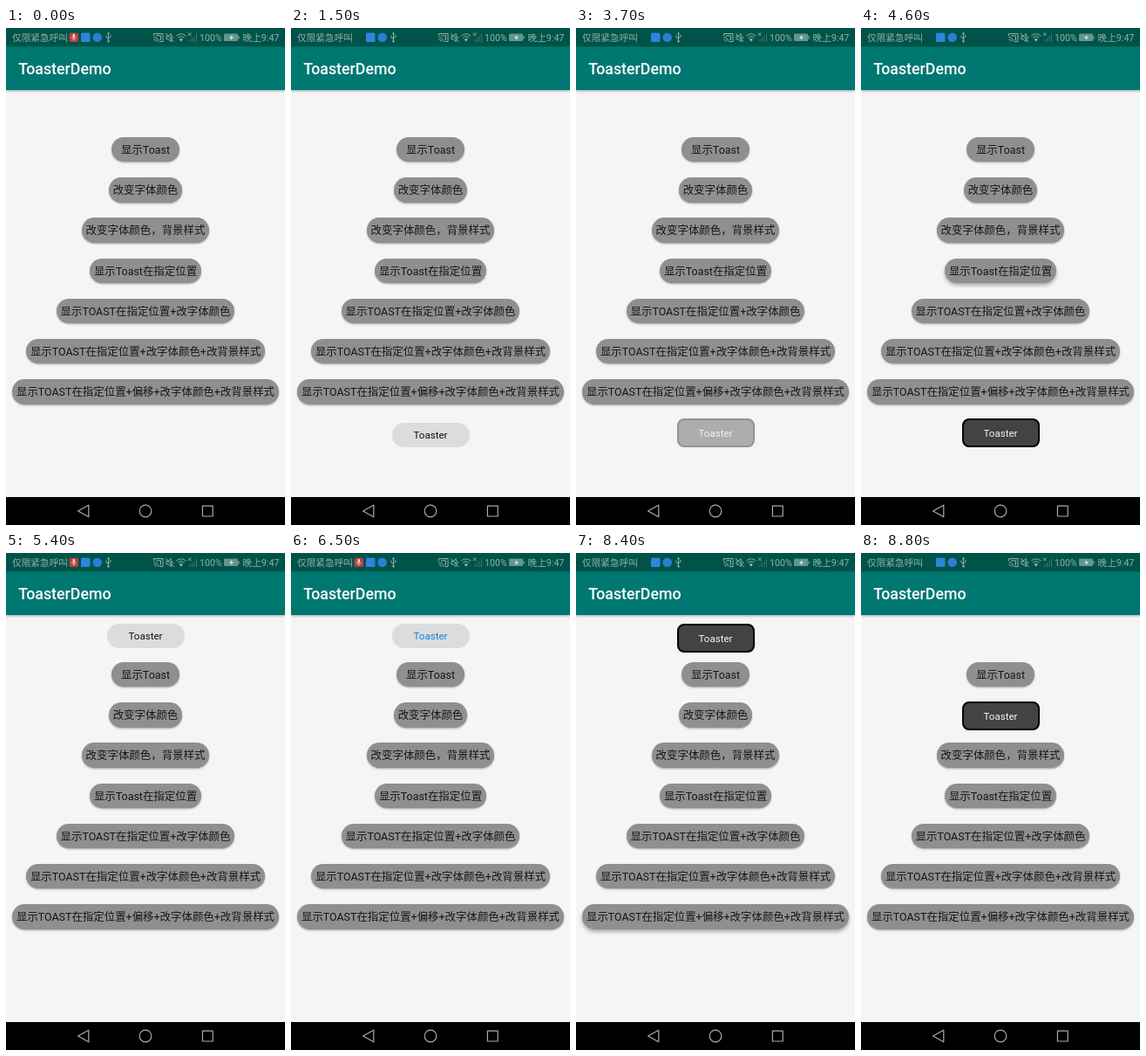
Write an HTML page that moves like this. It is 320 px wide and 569 px high and loops after 9000 ms.

```html
<!DOCTYPE html>
<html lang="zh-CN">
<head>
<meta charset="utf-8">
<title>ToasterDemo</title>
<style>
html, body { margin: 0; width: 100%; height: 100%; overflow: hidden; background: #f5f5f5; }
body { position: relative; font-family: Roboto, "Noto Sans CJK SC", "Noto Sans CJK", sans-serif; }
.bar { position: absolute; left: 0; top: 21px; width: 320px; height: 50px; background: #007872;
  box-shadow: 0 1px 3px rgba(0,0,0,.35); }
.bar span { position: absolute; left: 14.2px; top: 0; font-weight: 500; font-size: 17.78px;
  line-height: 52px; color: #fff; }
svg { position: absolute; left: 0; top: 0; width: 320px; height: 569px; }
.btn, .toast { position: absolute; text-align: center; white-space: nowrap; box-sizing: border-box; }
.btn { height: 28.4px; line-height: 29px; font-size: 12.44px; color: #161616; background: #8f8f8f;
  border-radius: 14.2px; }
.toast { left: 115.5px; width: 89px; height: 28.4px; line-height: 28.4px; font-size: 11.56px;
  border-radius: 14.2px; background: #dcdcdc; color: #111; opacity: 0; }
.blue { color: #0a84e6; }
.dark { height: 33px; line-height: 30px; border: 2px solid #000; border-radius: 8px;
  background: #444342; color: #f4f4f4; }
</style>
</head>
<body>
<div class="bar"><span>ToasterDemo</span></div>
<svg viewBox="0 0 320 569">
  <rect width="320" height="21.3" fill="#005349"/>
  <g fill="#8fb2ac" font-size="10.67">
    <text x="7" y="15">仅限紧急呼叫</text>
    <text x="222" y="14.6">100%</text>
    <text x="271.5" y="14.6">晚上9:47</text>
  </g>
  <g id="mic">
    <rect x="72.5" y="5.5" width="10.5" height="10.5" rx="2" fill="#b8403a"/>
    <rect x="76.6" y="6.8" width="2.4" height="4.6" rx="1.2" fill="#f0dcd8"/>
    <path d="M75.4 10v.4a2.4 2.4 0 0 0 4.8 0V10M77.8 12.8v1.8" fill="none" stroke="#f0dcd8" stroke-width=".7"/>
  </g>
  <rect x="86" y="5.5" width="10.5" height="10.5" rx="1.5" fill="#2d86dc"/>
  <circle cx="104.7" cy="10.7" r="5.3" fill="#2b7ed0"/>
  <g fill="none" stroke="#8fb2ac" stroke-width="1">
    <path d="M117.5 6v9M115 8.5v2.3l2.5 1.7M120 8v2l-2.5 1.5"/>
    <path d="M169.5 9V6.5h10.5v9h-4M169.5 10.5a5 5 0 0 1 5 5M169.5 13a2.5 2.5 0 0 1 2.5 2.5M172 8.8h5.5v4.5H176"/>
    <path d="M184 9.3h2l3.3-2.8v9L186 12.8h-2zM183 6l9.5 10M191 9.5a2.5 2.5 0 0 1 0 3"/>
    <path d="M195.3 9a8 8 0 0 1 11 0M197.2 11.2a5.2 5.2 0 0 1 7.2 0"/>
    <path d="M209 5.5l3.4 3.4M212.4 5.5L209 8.9"/>
    <path d="M211 16v-3M213.5 16v-5M216 16V9M218.5 16V6.5" opacity=".4"/>
  </g>
  <g fill="#8fb2ac">
    <path d="M117.5 4.5l1.6 2.3h-3.2z"/>
    <circle cx="117.5" cy="15.2" r="1.2"/>
    <path d="M198.7 13a3.2 3.2 0 0 1 4.2 0l-2.1 2.7z"/>
    <rect x="250" y="6.5" width="16" height="8.6" rx="1" opacity=".7"/>
    <rect x="266.2" y="9.2" width="1.6" height="3.4" opacity=".7"/>
  </g>
  <path d="M259.5 7.8l-3.5 3.6h2.4l-.8 2.7 3.6-3.7h-2.5z" fill="#e3efed"/>
  <rect y="537" width="320" height="32" fill="#000"/>
  <g fill="none" stroke="#aaa" stroke-width="1.2" stroke-linejoin="round">
    <path d="M82.6 553L94.8 546.2V559.8Z"/>
    <circle cx="160" cy="553" r="6.8"/>
    <rect x="225.4" y="547.2" width="11.8" height="11.8"/>
  </g>
</svg>
<script>
const LOOP = 9000, LEAD = 20, FADE = 300;
// label, width, press time, time the toast is fully shown, toast style, toast top
const rows = [
  ['显示Toast', 78, 800, 1500, '', 451.6],
  ['改变字体颜色', 84, 2000, 2800, 'blue', 451.6],
  ['改变字体颜色，背景样式', 146, 3100, 3900, 'dark', 447],
  ['显示Toast在指定位置', 128, 4400, 5100, '', 80.8],
  ['显示TOAST在指定位置+改字体颜色', 204, 5700, 6500, 'blue', 80.8],
  ['显示TOAST在指定位置+改字体颜色+改背景样式', 274, 6800, 7700, 'dark', 80.8],
  ['显示TOAST在指定位置+偏移+改字体颜色+改背景样式', 306, 8200, 8800, 'dark', 169.8]
];
const css = document.head.appendChild(document.createElement('style'));

function add(cls, text, style) {
  const el = document.body.appendChild(document.createElement('div'));
  el.className = cls;
  el.textContent = text;
  Object.assign(el.style, style);
  return el;
}

// stops: [ms, declarations] pairs
function loop(el, name, stops) {
  const body = stops.map(([ms, rule]) => `${(ms / LOOP * 100).toFixed(3)}%{${rule}}`).join('');
  css.append(`@keyframes ${name}{${body}}\n`);
  el.style.animation = `${name} ${LOOP}ms linear infinite`;
}

const fades = list => list.map(([ms, v]) => [ms, `opacity:${v}`]);
const face = (fill, y, blur) =>
  `background-color:${fill};box-shadow:0 ${y}px ${blur}px rgba(0,0,0,.3)`;
const low = fill => face(fill, 1.2, 2);
const high = fill => face(fill, 3, 5);
const GREY = '#8f8f8f', DOWN = '#434343';

rows.forEach(([label, w, press], i) => {
  const el = add('btn', label, {
    left: 160 - w / 2 + 'px', width: w + 'px', top: 125 + 46.22 * i + 'px'
  });
  const on = press - LEAD, off = press + (i ? 180 : 280);
  loop(el, 'press' + i, [
    [0, low(GREY)], [on - 1, low(GREY)],
    [on, low(DOWN)], [on + 100, high(DOWN)],
    [off - 1, high(DOWN)], [off, high(GREY)],
    [off + 120, low(GREY)], [LOOP, low(GREY)]
  ]);
});

rows.forEach(([, , , shown, kind, top], i) => {
  const el = add('toast ' + kind, 'Toaster', { top: top + 'px' });
  const end = shown - LEAD, next = rows[i + 1];
  const out = next && next[2] + 280;
  loop(el, 'toast' + i, fades([
    [0, 0], [end - FADE, 0], [end, 1],
    ...(next ? [[out, 1], [out + 200, 0], [LOOP, 0]] : [[LOOP, 1]])
  ]));
});

loop(document.getElementById('mic'), 'blink', fades([
  [0, 1], [790, 1], [890, 0], [2050, 0], [2150, 1], [3250, 1], [3350, 0],
  [5250, 0], [5390, 1], [6950, 1], [7050, 0], [LOOP, 0]
]));
</script>
</body>
</html>
```
